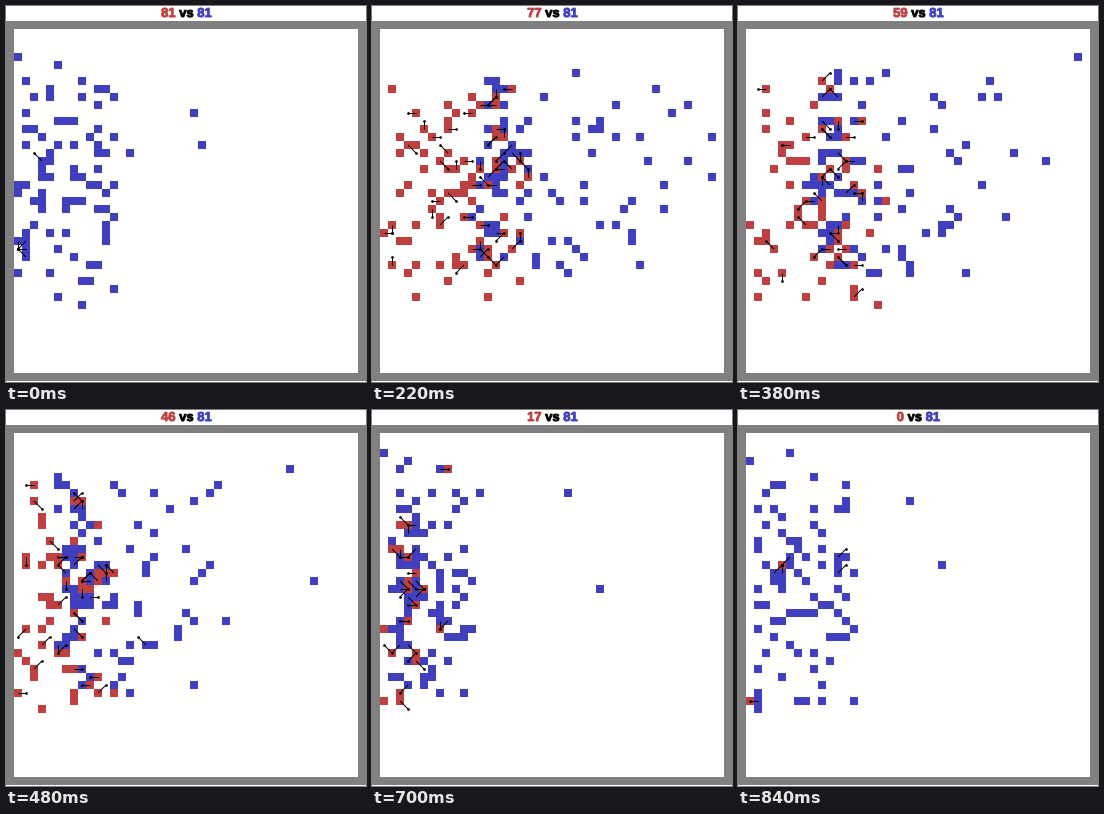
Animation of 360x376 px, one loop 880 ms. Source, as a matplotlib script:

```python
import numpy as np
import matplotlib.pyplot as plt
from matplotlib.animation import FuncAnimation
from matplotlib.collections import LineCollection
from matplotlib.patches import PathPatch, Rectangle
from matplotlib.path import Path
from matplotlib.textpath import TextPath

W, H, CELL, SIDE = 360, 376, 8, 43
DPI = 100
PX = 72 / DPI
FRAMES, TICK, ARMY = 44, 20, 81
RED, BLUE = (191, 64, 64), (64, 64, 191)
FONT = {"family": "Liberation Sans", "weight": "bold"}
EM = 13
DIGIT, SPACE = 0.556 * EM, 0.278 * EM

# How the crowds develop at the key ticks
KEYS = [2, 5, 11, 19, 29, 35, 42, 44]
FRONT = [20, 16, 13, 9.5, 3.5, 1, 1, 0]    # leftmost blue column
DEPTH = [22, 26, 25, 22, 15, 10, 12, 13]   # blue columns behind the front
CROWDING = [1, 1, 2.3, 2.3, 2.4, 1.2, 1.1, 1]
RED_DEPTH = [14, 17, 17, 15, 9, 6, 4, 4]
SCORE = [81, 81, 77, 59, 34, 17, 0, 0]

# Two blues that trail far behind the rest
TRAILERS = [
    [(40, 8), (38, 8), (41, 13), (41, 3), (26, 6), (23, 7), (20, 8), (22, 10)],
    [(42, 20), (42, 20), (41, 18), (37, 16), (37, 21), (27, 19), (24, 16),
     (23, 14)]]
HUNTERS = 3

HOLDS = {6, 7, 15, 23, 26, 38, 43}
rng = np.random.default_rng(7)


def key(values, t):
    return np.interp(t, KEYS, values)


def ranks():
    return (rng.permutation(ARMY) + 0.5) / ARMY


def wander():
    walk = np.zeros((FRAMES + 1, ARMY, 2))
    for t in range(1, FRAMES + 1):
        walk[t] = 0.7 * walk[t - 1] + rng.normal(0, 0.7, (ARMY, 2))
    return walk


blue_u, blue_v, red_u, red_v = (ranks() for _ in range(4))
blue_walk, red_walk = wander(), wander()

reach = range(-7, 8)
NEAR = sorted(((a, b) for a in reach for b in reach),
              key=lambda d: d[0] ** 2 + d[1] ** 2)
STEPS = NEAR[1:9]


def spread_rows(v, middle, t):
    """Even rows at first, later a dense middle with long tails."""
    s = 2 * v - 1
    late = np.interp(t, [5, 35], [0, 1])
    return middle + (11.5 + 4 * late) * s * (1 - 0.4 * late * (1 - s ** 2))


def last_stand(t):
    return 0, np.interp(t, [42, 44], [33, 27])


def blue_points(t):
    cols = key(FRONT, t) + key(DEPTH, t) * blue_u ** key(CROWDING, t)
    points = np.stack([cols, spread_rows(blue_v, 18, t)], 1) + blue_walk[t]
    for i, path in enumerate(TRAILERS):
        points[i] = [key(axis, t) for axis in zip(*path)]
    # a few close in on the last red
    pull = np.interp(t, [29, 41], [0, 1])
    x, y = last_stand(t)
    for i in range(HUNTERS):
        j = len(TRAILERS) + i
        goal = np.array([x + 1, y - 1 + i])
        points[j] += pull * (goal - points[j])
    return points


def red_points(t):
    cols = key(RED_DEPTH, t) * red_u ** 0.8
    points = np.stack([cols, spread_rows(red_v, 20, t)], 1) + red_walk[t]
    pull = np.interp(t, [19, 35], [0, 1])
    points[0] += pull * (np.array(last_stand(t)) - points[0])
    return points


def settle(points, taken):
    """Round to cells, moving each unit to the closest free one."""
    cells = []
    for x, y in np.clip(np.rint(np.abs(points)), 0, SIDE - 1).astype(int):
        for a, b in NEAR:
            c = (int(x + a), int(y + b))
            if c not in taken and min(c) >= 0 and max(c) < SIDE:
                taken.add(c)
                cells.append(c)
                break
    return cells


def score(t):
    return int(np.ceil(key(SCORE, t) - 0.5))


def strikes(team, foes, hit, stray, dice):
    """Hits on neighbouring foes, plus some blows into the air."""
    lines = []
    for x, y in team:
        close = [f for f in foes if max(abs(f[0] - x), abs(f[1] - y)) == 1]
        if close and dice.random() < hit:
            lines.append([(x, y), close[0]])
        elif dice.random() < stray:
            a, b = STEPS[dice.integers(8)]
            lines.append([(x, y), (x + a, y + b)])
    return lines


def scene(t, alive):
    taken = set()
    first = len(TRAILERS) + HUNTERS
    spots = blue_points(t)
    reds = settle(red_points(t)[:alive], taken)
    blues = settle(spots[:first], taken)
    blues += settle(spots[first:], taken)
    dice = np.random.default_rng(t)
    lines = strikes(reds, blues, 0.4, 0.32, dice)
    lines += strikes(blues, reds or [last_stand(t)],
                     1 if alive < 2 else 0.4, 0.03, dice)
    return reds, blues, np.array(lines, float).reshape(-1, 2, 2)


def build():
    end = (*scene(FRAMES, 0), ARMY)
    shots = [end, end]
    alive = ARMY
    for t in range(2, FRAMES):
        if t in HOLDS:
            shots.append(shots[-1])
        else:
            shots.append((*scene(t, alive), score(t)))
            alive = score(t)
    return shots


shots = build()

fig = plt.figure(figsize=(W / DPI, H / DPI), dpi=DPI, facecolor="white")
ax = fig.add_axes([0, 0, 1, 1])
ax.add_patch(Rectangle((0, 1), W, 360, fc="#808080", lw=0))
board = ax.imshow(np.full((SIDE, SIDE, 3), 255, np.uint8), zorder=2,
                  extent=(8, 352, 9, 353), interpolation="nearest",
                  aspect="auto")
hits = LineCollection([], colors="black", linewidths=PX, zorder=3)
ax.add_collection(hits)
dots = ax.scatter([], [], s=(2.7 * PX) ** 2, c="black", lw=0, zorder=4)
words = []
for rgb in (RED, (0, 0, 0), BLUE):
    color = np.array(rgb) / 255
    patch = PathPatch(Path(np.zeros((1, 2))), fc=color, ec=color,
                      lw=0.9 * PX, zorder=5)
    words.append(ax.add_patch(patch))
ax.set_xlim(0, W)
ax.set_ylim(0, H)
ax.axis("off")


def set_title(left, right):
    parts = [str(left), "vs", str(right)]
    total = DIGIT * sum(map(len, parts)) + 2 * SPACE
    x = W / 2 - total / 2 + 0.4
    for patch, s in zip(words, parts):
        patch.set_path(TextPath((x, H - 11), s, size=EM, prop=FONT))
        x += DIGIT * len(s) + SPACE


def update(t):
    reds, blues, lines, left = shots[t]
    grid = np.full((SIDE, SIDE, 3), 255, np.uint8)
    for team, color in ((reds, RED), (blues, BLUE)):
        for x, y in team:
            grid[y, x] = color
    board.set_data(grid)
    ends = lines * (CELL, -CELL) + (12, 349)
    hits.set_segments(list(ends))
    dots.set_offsets(ends[:, 1])
    set_title(left, ARMY)
    return [board, hits, dots, *words]


anim = FuncAnimation(fig, update, frames=FRAMES, interval=TICK,
                     repeat=True, repeat_delay=0, blit=False)
plt.show()
```
